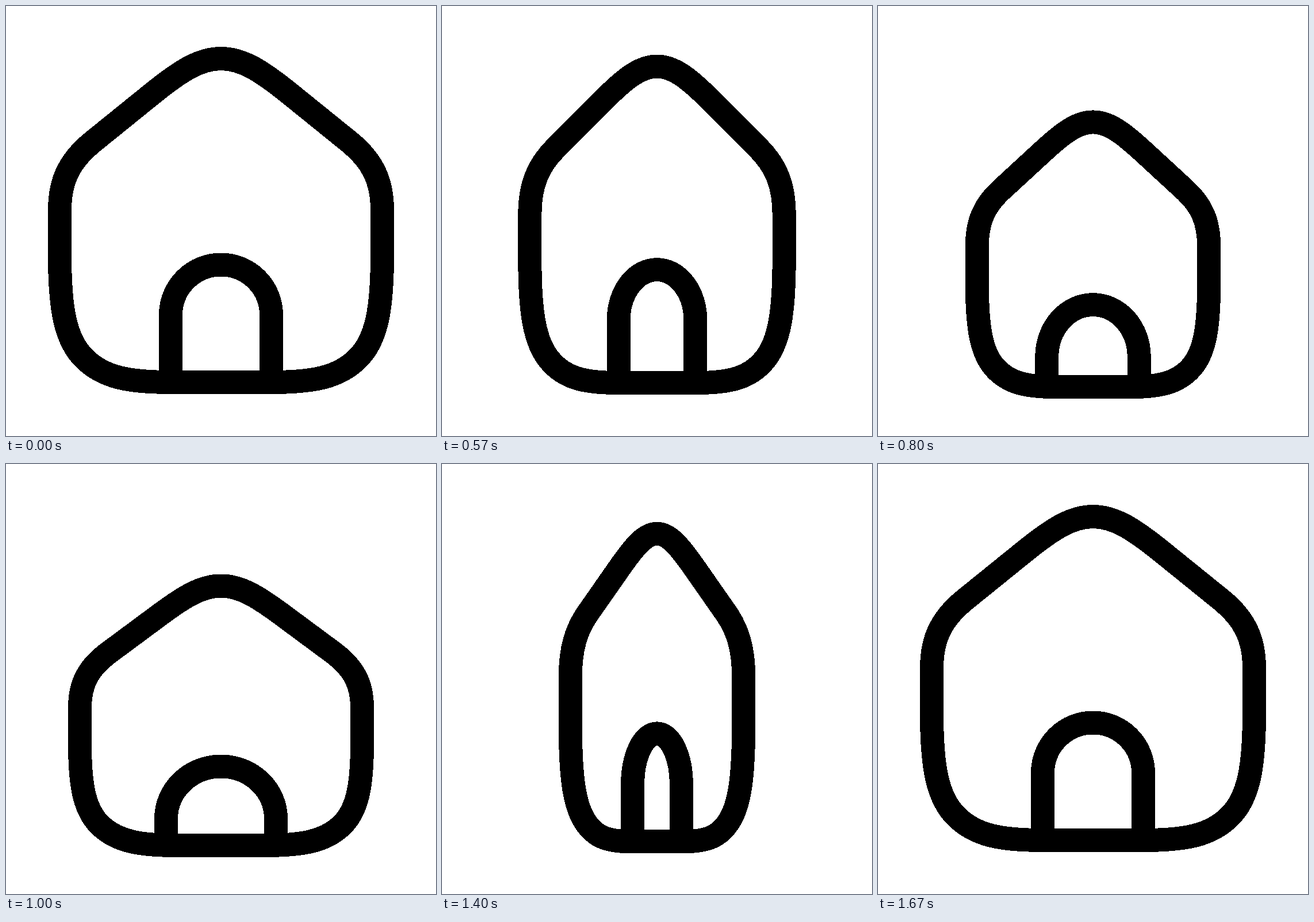
An HTML page for the animation above (1700 ms loop, 748 by 748 pixels).

```html
<!DOCTYPE html>
<html lang="en">
<head>
<meta charset="utf-8">
<title>Home</title>
<style>
  html, body { margin: 0; height: 100%; overflow: hidden; background: #fff; }
  svg { display: block; width: 100vw; height: 100vh; }
  path {
    fill: none; stroke: #000; stroke-width: 41;
    stroke-linecap: round; stroke-linejoin: round; shape-rendering: crispEdges;
  }
</style>
</head>
<body>
<svg viewBox="0 0 748 748"><path id="home"/></svg>
<script>
const LOOP = 1700, STEP = 100 / 3, CX = 374;
const home = document.getElementById('home');
const mix = (a, b, p) => a + (b - a) * p;

// cubic-bezier(x1, 0, x2, 1)
function ease(u, x1, x2) {
  if (u <= 0) return 0;
  if (u >= 1) return 1;
  let lo = 0, hi = 1;
  for (let i = 0; i < 24; i++) {
    const s = (lo + hi) / 2, r = 1 - s;
    if (3 * x1 * s * r * r + 3 * x2 * s * s * r + s * s * s < u) lo = s;
    else hi = s;
  }
  return lo * lo * (3 - 2 * lo);
}

// 0 = tall front, 1 = squashed and mirrored
const flip = t => ease((t - 375) / 610, 0.673, 0.396) - ease((t - 1035) / 620, 0.669, 0.309);

// Half outline: offsets from the centre line, apex to floor
const HALF = [
  ['M', 0, 91.5],
  ['C', 38, 91.5, 72, 114, 122, 154.5],
  ['L', 224, 237],
  ['C', 262, 268, 280.5, 302, 280.5, 355],
  ['L', 280.5, 434],
  ['C', 280.5, 530, 270, 582, 237, 614],
  ['C', 204, 646, 161, 654.5, 87, 654.5],
  ['L', 0, 654.5]
];

function shape(p) {
  const sx = mix(1, -491 / 561, p);
  const top = mix(91.5, 212, p), floor = mix(654.5, 663.5, p);
  const y = v => top + (v - 91.5) * (floor - top) / 563;
  const half = side => HALF.map(([cmd, ...v]) =>
    cmd + v.map((n, i) => (i % 2 ? y(n) : CX + side * sx * n).toFixed(2)).join(' ')).join('');

  const rx = Math.abs(mix(87.5, -95.5, p));
  const spring = mix(537.5, 617, p), ry = spring - mix(450, 526, p);
  const door = `M${CX - rx} ${floor}V${spring}A${rx} ${ry} 0 0 1 ${CX + rx} ${spring}V${floor}`;
  return half(1) + half(-1) + door;
}

function draw(now) {
  let step = Math.floor((now % LOOP + 4) / STEP) % 51;
  if (step % 12 === 0) step++; // every twelfth step is held twice as long
  home.setAttribute('d', shape(flip(step * STEP)));
  requestAnimationFrame(draw);
}

const start = performance.now();
draw(0);
function tick() { }
</script>
</body>
</html>
```
